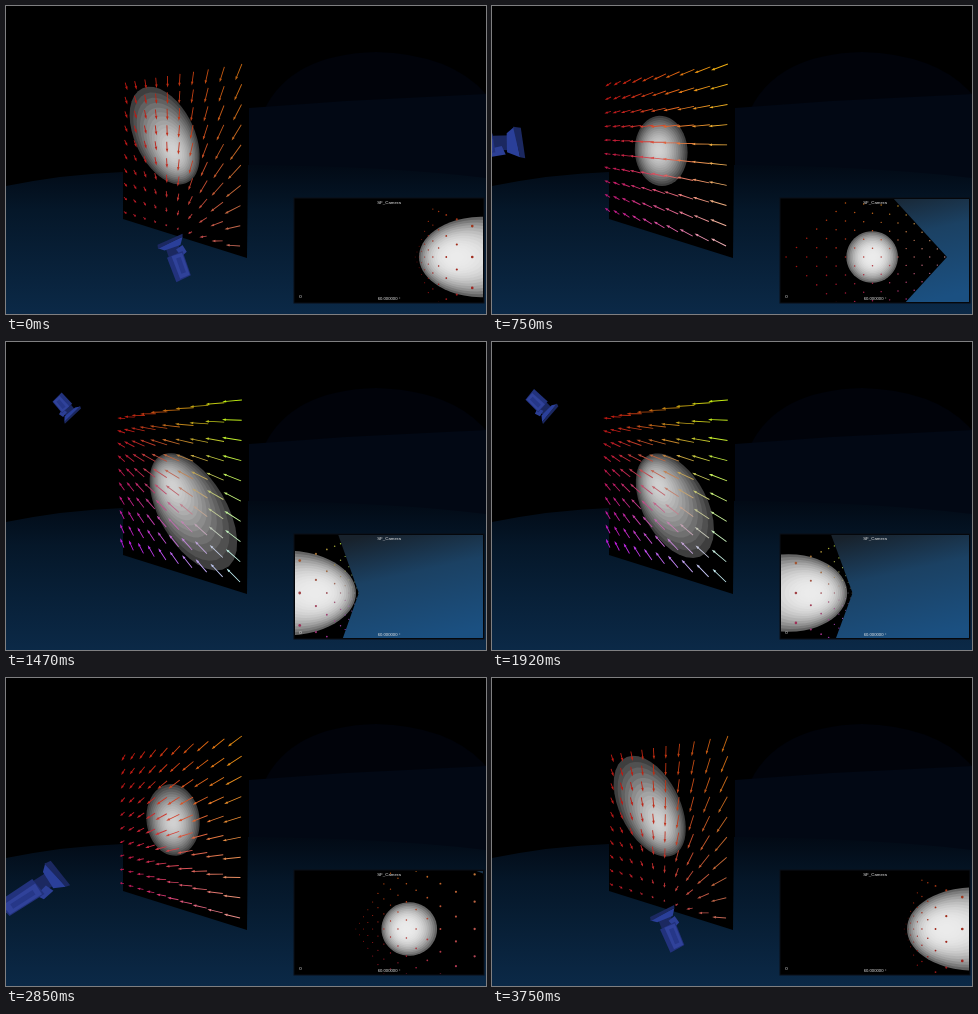
An HTML page that plays this animation: 480x308 px, repeating every 3780 ms.

```html
<!DOCTYPE html>
<html lang="en">
<head>
<meta charset="utf-8">
<title>Camera and vector field</title>
<style>
html, body { margin: 0; width: 100%; height: 100%; overflow: hidden; background: #000; }
svg { display: block; width: 100vw; height: 100vh; }
text { font-family: "Liberation Sans", Arial, sans-serif; fill: #e8e8e8; text-anchor: middle; }
</style>
</head>
<body>
<svg viewBox="0 0 480 308">
  <defs>
    <linearGradient id="floor" gradientUnits="userSpaceOnUse" x1="0" y1="160" x2="0" y2="308">
      <stop offset="0" stop-color="#020a15"/>
      <stop offset=".3" stop-color="#051729"/>
      <stop offset="1" stop-color="#0b2947"/>
    </linearGradient>
    <linearGradient id="ground" gradientUnits="userSpaceOnUse" x1="400" y1="185" x2="425" y2="297">
      <stop offset="0" stop-color="#18222c"/>
      <stop offset=".4" stop-color="#1b4163"/>
      <stop offset="1" stop-color="#1b5081"/>
    </linearGradient>
    <clipPath id="panelClip"><path d="M117 70L243 54L241 252L117 213Z"/></clipPath>
    <clipPath id="viewClip"><rect x="289" y="193" width="188" height="103"/></clipPath>
  </defs>

  <rect width="480" height="308" fill="#000"/>
  <path d="M258 104Q285 48 370 46Q445 48 480 88V110H258Z" fill="#01030a"/>
  <path d="M243 102L340 95L480 88V308H243Z" fill="#020814"/>
  <path d="M0 180Q60 168 117 166L243 159Q380 160 480 172V308H0Z" fill="url(#floor)"/>

  <path d="M117 70L243 54L241 252L117 213Z" fill="#000"/>
  <g id="spot" clip-path="url(#panelClip)"></g>
  <g id="arrows"></g>

  <g id="cam">
    <path d="M5 -7H20V7H5Z" fill="#1b2860"/>
    <path d="M10 -11L21 -13L25 -6L13 -3Z" fill="#2c3f95"/>
    <path d="M18 -9L54 -9L57 8L20 9Z" fill="#22327c"/>
    <path d="M20 -8L53 -8L54 3L20 4Z" fill="#30429a"/>
    <path d="M25 -5H48V0H25Z" fill="#263788"/>
    <path d="M-1 -14L9 -9V9L3 15Z" fill="#2a3f99"/>
    <path d="M-5 -15L-1 -14L4 15L-2 14Z" fill="#1b2860"/>
  </g>

  <rect x="288" y="192" width="190" height="105" fill="#000" stroke="#0a0f16"/>
  <g clip-path="url(#viewClip)">
    <rect x="288" y="192" width="190" height="105" fill="url(#ground)"/>
    <path id="board"/>
    <g id="ball"></g>
    <g id="dots"></g>
    <text x="383" y="198.4" font-size="4.4">SF_Camera</text>
    <text x="383" y="293.8" font-size="4.2">60.000000 °</text>
    <text x="294.5" y="291.8" font-size="4.4">0</text>
  </g>
</svg>

<script>
const LOOP = 3780, STEP = 30, TURN = 3547;
const N = 10, SIDE = 182, CORNER = 133, ARROW = 19.5;
const ORBIT = 108, CONE = .39, RINGS = 16, BODY = 26;
const { sin, cos, sqrt, hypot, PI } = Math;
const $ = id => document.getElementById(id);

function make(tag, parent) {
  const el = document.createElementNS("http://www.w3.org/2000/svg", tag);
  $(parent).appendChild(el);
  return el;
}
const outline = pts => "M" + pts.map(p => p[0].toFixed(2) + " " + p[1].toFixed(2)).join("L") + "Z";

// Panel axes (right, down, out) to world, and world to stage
const turn = (r, d, n) => [.914 * r - .01 * d - .404 * n, d, -.404 * r - .914 * n];
const place = (r, d, n) => add([-88.2, 27, 215.8], turn(r, d, n), 1);
const add = (p, q, k) => p.map((v, i) => v + q[i] * k);
const project = p => [240 + 179 * p[0] / p[2], 122 + 179 * p[1] / p[2]];

// Panel diagonals (a: towards bottom right, b: towards top right) to panel axes
const fromDiagonal = (a, b) => [(a + b) / sqrt(2), (a - b) / sqrt(2)];

// What the small camera sees of a panel point; it orbits by phi and turns by twice that
function see(a, b, phi) {
  const depth = ORBIT * cos(phi) - a * sin(2 * phi);
  const x = a * cos(2 * phi) + ORBIT * sin(phi);
  return [383 + 66 * x / depth, 251 - 66 * b / depth, depth];
}

// Where a cone of light around the line of sight meets the panel
function ring(phi, spread) {
  return Array.from({ length: 48 }, (_, i) => {
    const tau = i * PI / 24, c = spread * cos(tau);
    const reach = ORBIT * cos(phi) / (cos(phi) + c * sin(phi));
    return [ORBIT * sin(phi) + reach * (c * cos(phi) - sin(phi)), reach * spread * sin(tau)];
  });
}

const rings = Array.from({ length: RINGS }, (_, i) => {
  const k = 1 - i / RINGS, spot = make("path", "spot"), ball = make("path", "ball");
  const grey = v => `rgb(${[v, v, v].map(Math.round)})`;
  spot.setAttribute("fill", grey(62 + 148 * (1 - k * k)));
  ball.setAttribute("fill", grey(100 + 135 * (1 - k ** 3)));
  return { spread: CONE * k, spot, ball };
});

const cells = Array.from({ length: N * N }, (_, i) => {
  const u = i % N / (N - 1), v = Math.floor(i / N) / (N - 1);
  const r = (u - .5) * SIDE, d = (v - .5) * SIDE;
  return {
    u, v, pos: place(r, d, 0), a: (r + d) / sqrt(2), b: (r - d) / sqrt(2),
    arrow: make("path", "arrows"), dot: make("circle", "dots")
  };
});

function arrowPath([x0, y0], [x1, y1]) {
  const len = hypot(x1 - x0, y1 - y0) || 1;
  const ux = (x1 - x0) / len, uy = (y1 - y0) / len, neck = len - Math.min(3.8, len * .5);
  const at = (along, side) => [x0 + ux * along - uy * side, y0 + uy * along + ux * side];
  return outline([at(0, .45), at(neck, .45), at(neck, 1.25), at(len, 0),
    at(neck, -1.25), at(neck, -.45), at(0, -.45)]);
}

// Red everywhere, green grows to the right, blue grows downwards
function tint(u, v, s, gain) {
  const red = .77 + .22 * u * (1 - s * s);
  const green = .1 + u ** 1.7 * (.6 - .3 * s);
  const blue = .07 + v ** 1.5 * (.45 - .4 * s + .2 * u);
  return `rgb(${[red, green, blue].map(c => Math.round(255 * gain * Math.min(1, c)))})`;
}

function draw(t) {
  const s = cos(2 * PI * (t - TURN) / LOOP);
  const phi = (34 * s + 18 * s ** 3) * PI / 180;

  const eye = place(
    24 * s + 22 * s ** 2 + 38 * s ** 3 - 8,
    85 * s + 6 * s ** 2 - 18 * s ** 3 - 12,
    110 - 10 * s - 52 * s ** 4);
  const back = turn(...fromDiagonal(sin(1.7 * phi), 0), cos(1.7 * phi));
  const [x, y] = project(eye), [bx, by] = project(add(eye, back, BODY));
  const angle = Math.atan2(by - y, bx - x) * 180 / PI;
  $("cam").setAttribute("transform",
    `translate(${x} ${y}) rotate(${angle}) scale(${hypot(bx - x, by - y) / 57} ${125 / eye[2]})`);

  for (const g of rings) {
    const pts = ring(phi, g.spread);
    g.spot.setAttribute("d", outline(pts.map(p => project(place(...fromDiagonal(...p), 0)))));
    g.ball.setAttribute("d", outline(pts.map(p => see(...p, phi))));
  }

  // Keep the panel's right corner in front of the small camera
  const near = phi > 0 ? Math.min(CORNER, (ORBIT * cos(phi) - 4) / sin(2 * phi)) : CORNER;
  const edge = [see(0, CORNER, phi), see(near, CORNER - near, phi),
    see(near, near - CORNER, phi), see(0, -CORNER, phi)];
  $("board").setAttribute("d", outline([[0, edge[0][1]], ...edge, [0, edge[3][1]]]));

  for (const c of cells) {
    const aim = add(eye, c.pos, -1);
    const tip = add(c.pos, aim, ARROW / hypot(...aim));
    c.arrow.setAttribute("d", arrowPath(project(c.pos), project(tip)));
    c.arrow.setAttribute("fill", tint(c.u, c.v, s, .95));

    const [dx, dy, depth] = see(c.a, c.b, phi);
    c.dot.setAttribute("r", depth > 4 ? Math.min(1.7, 80 / depth) : 0);
    c.dot.setAttribute("cx", dx);
    c.dot.setAttribute("cy", dy);
    c.dot.setAttribute("fill", tint(c.u, c.v, s, .8));
  }
}

function tick() {
  draw(Math.floor(performance.now() % LOOP / STEP) * STEP);
  requestAnimationFrame(tick);
}
tick();
</script>
</body>
</html>
```
